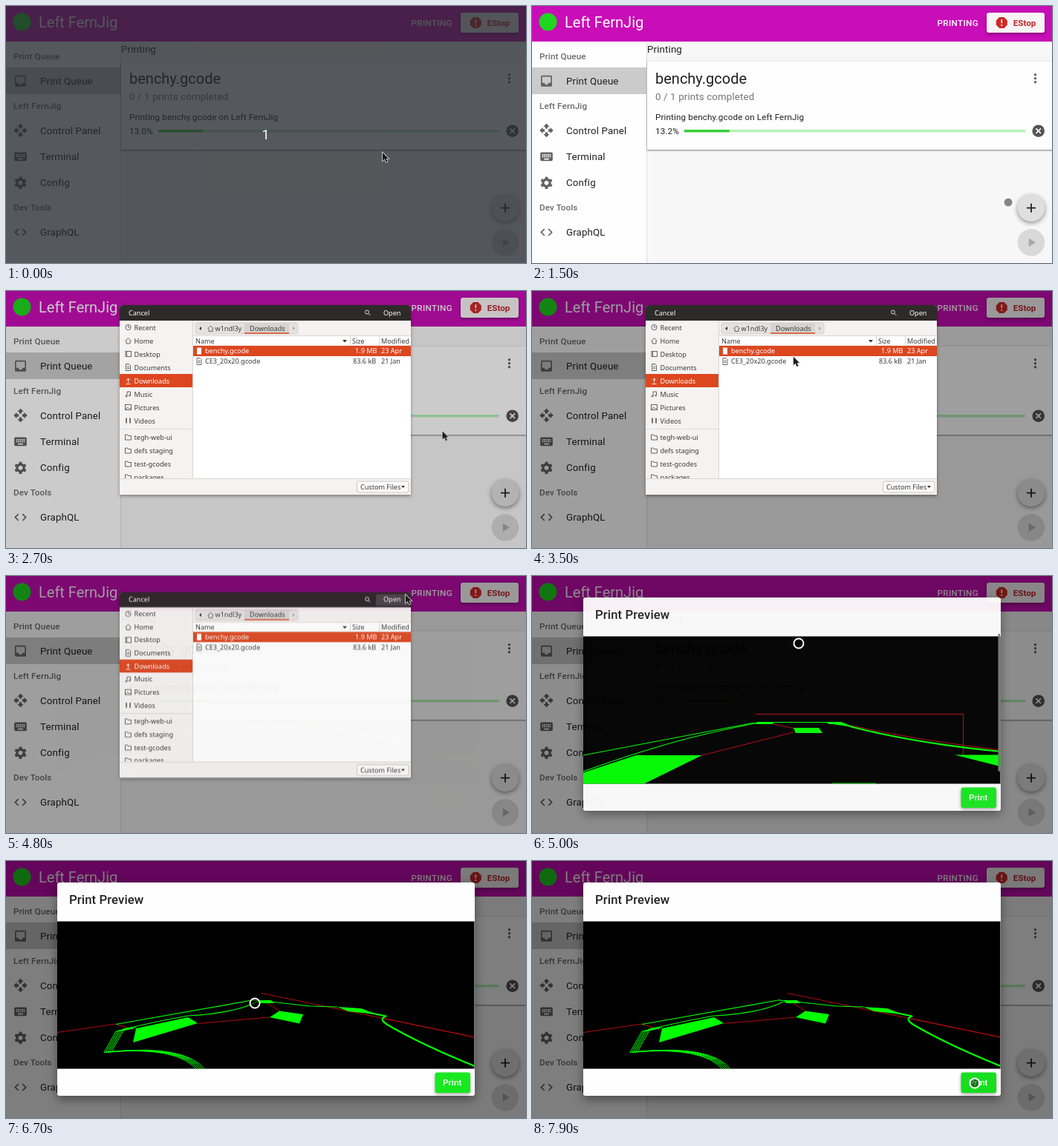
Recreate the animation shown at these times as an HTML page. Size 700x347 px, loop 8 s.

```html
<!DOCTYPE html>
<html lang="en">
<head>
<meta charset="utf-8">
<title>Print queue demo</title>
<style>
html, body { margin: 0; width: 100%; height: 100%; overflow: hidden; background: #fafafa; }
svg { display: block; width: 100vw; height: 100vh; }
text { font-family: Roboto, sans-serif; fill: #212121; white-space: pre; }
.body1 { font-size: 13.33px; letter-spacing: .00938em; }
.body2 { font-size: 11.67px; letter-spacing: .01071em; }
.h5 { font-size: 20px; }
.h6 { font-size: 16.67px; font-weight: 500; letter-spacing: .0075em; }
.sub { font-size: 11.67px; font-weight: 500; letter-spacing: .01071em; fill: #6b6b6b; }
.btn { font-size: 11.67px; font-weight: 500; letter-spacing: .02857em; }
.icon { fill: #626262; }
.white { fill: #fff; }
.lift { filter: drop-shadow(0 2px 2px rgba(0,0,0,.35)); }
.files text { font: 9.1px "Noto Sans", "Open Sans", sans-serif; fill: #3b3b3b; }
.files text.white { fill: #fff; }
.glyph { fill: none; stroke: #555; stroke-width: .9; }
.glyph .hot { stroke: #fff; }

.anim, .scene path { animation: 8s linear infinite; }
.curtain { animation-name: curtain; }
.digits { animation-name: digits; animation-timing-function: step-end; }
.bar { animation-name: bar; transform-origin: 205px 0; }
.dim { animation-name: dim; }
.files { animation-name: files; transform-origin: 349px 147px; }
.place { animation-name: place; }
.veil { animation-name: veil; }
.open { animation-name: open; }
.row { animation-name: row; }
.preview { animation-name: preview; }
.scroll { animation-name: scroll; }
.press { animation-name: press; }
.arrow { animation-name: arrow; paint-order: stroke; }
.ring { animation-name: ring; }
.scene path { animation-name: orbit; }
.fill { fill: #0f0; }
.line { fill: none; stroke: #0f0; stroke-width: 1.2; }
.thick { stroke-width: 2.2; }
.travel { fill: none; stroke: #b30d0d; stroke-width: 1; }

@keyframes curtain { 0%, 2% { opacity: 1 } 12.5%, 100% { opacity: 0 } }
@keyframes digits {
  0% { transform: translateY(0) }
  8% { transform: translateY(-20px) }
  24% { transform: translateY(-40px) }
  60% { transform: translateY(-60px) }
}
@keyframes bar { 0% { transform: scaleX(.13) } 18.75% { transform: scaleX(.132) } 100% { transform: scaleX(.14) } }
@keyframes dim {
  0%, 29.8% { opacity: 0 }
  30% { opacity: .015 }
  37.5%, 60% { opacity: .38 }
  62.5% { opacity: .45 }
  66.25%, 100% { opacity: .5 }
}
@keyframes files {
  0%, 29.99% { opacity: 0; transform: scaleY(.5) }
  30% { opacity: .6; transform: scaleY(.53); animation-timing-function: ease-out }
  33.75%, 59.9% { opacity: 1; transform: none }
  62%, 100% { opacity: 0; transform: scaleY(.6) }
}
@keyframes place { 0%, 31.2% { opacity: 0 } 33.75%, 100% { opacity: 1 } }
@keyframes veil { 0%, 30% { opacity: .2 } 33.75%, 100% { opacity: 0 } }
@keyframes row { 0%, 48.5% { opacity: 0 } 50%, 51% { opacity: .07 } 52.5%, 100% { opacity: 0 } }
@keyframes open { 0%, 56% { opacity: 0 } 57.5%, 100% { opacity: .14 } }
@keyframes preview {
  0%, 60% { opacity: 0 }
  62.5% { opacity: .95 }
  66.25%, 100% { opacity: 1 }
}
@keyframes scroll { 0%, 65% { opacity: 1 } 70%, 100% { opacity: 0 } }
@keyframes press { 0%, 98.7% { opacity: 0 } 98.75%, 100% { opacity: .04 } }
@keyframes arrow {
  0%, 16.2% { opacity: 1; transform: translate(507px,198px) }
  16.25%, 31.2% { opacity: 0; transform: translate(677px,275px) }
  31.25% { opacity: 1; transform: translate(677px,275px); animation-timing-function: ease-out }
  40%, 42% { opacity: 1; transform: translate(468px,75px) }
  43.75%, 48.7% { opacity: 1; transform: translate(352px,89px) }
  51.2% { opacity: 1; transform: translate(440px,80px) }
  51.25%, 56.2% { opacity: 0; transform: translate(539px,25px) }
  56.25%, 60% { opacity: 1; transform: translate(539px,25px) }
  61.2% { opacity: 1; transform: translate(440px,62px) }
  61.25%, 100% { opacity: 0; transform: translate(440px,62px) }
}
@keyframes ring {
  0%, 15.6% { opacity: 0; transform: translate(510px,204px) }
  16.25% { opacity: 1; transform: translate(535px,216px) }
  18.75% { opacity: 1; transform: translate(641px,265px); animation-timing-function: ease-out }
  26.25%, 31.2% { opacity: 1; transform: translate(677px,275px) }
  31.25% { opacity: 0; transform: translate(677px,275px) }
  61.2% { opacity: 0; transform: translate(440px,62px) }
  61.25% { opacity: 1; transform: translate(440px,62px) }
  62.5%, 73% { opacity: 1; transform: translate(359px,91px); animation-timing-function: ease-in-out }
  83.75%, 84.2% { opacity: 1; transform: translate(335px,192px); animation-timing-function: ease-in-out }
  92.5%, 94% { opacity: 1; transform: translate(627px,314px) }
  95%, 100% { opacity: 1; transform: translate(596px,300px) }
}
@keyframes orbit {
  0%, 73% { d: var(--a); animation-timing-function: ease-in-out }
  83.75%, 100% { d: var(--b) }
}
</style>
</head>
<body>
<svg viewBox="0 0 700 347" preserveAspectRatio="none">
  <defs>
    <clipPath id="digitsClip"><rect x="160" y="161" width="42" height="16"/></clipPath>
    <clipPath id="filesClip"><path d="M153 275V24q0-5 5-5h382q5 0 5 5v251z"/></clipPath>
    <clipPath id="placesClip"><rect x="153" y="40" width="99" height="213"/></clipPath>
    <clipPath id="sceneClip"><rect x="69" y="81.500" width="561.500" height="199"/></clipPath>
    <path id="folder" d="M0 1h3l1 1.500h4v5.500h-8z"/>
    <path id="sheet" d="M1 0h4l2 2v7h-6zM2.500 4h3M2.500 6h3"/>
  </defs>

  <!-- page -->
  <rect width="700" height="347" fill="#f8f7f7"/>
  <rect y="47" width="154" height="300" fill="#fefefe"/>
  <path d="M154.500 47v300" stroke="#dedede"/>
  <rect y="83" width="154" height="36" fill="#cbcbcb"/>
  <rect width="700" height="48" fill="#c90db7"/>
  <circle cx="21.500" cy="21.500" r="12" fill="#1fd51f"/>
  <text class="h5 white" x="44" y="29.300">Left FernJig</text>
  <text class="btn white" x="545.500" y="26.500">PRINTING</text>
  <rect class="lift" x="612" y="9" width="78" height="27" rx="3" fill="#f8f4f6"/>
  <g transform="translate(622.300 12.500) scale(.8333)">
    <path d="M15.730 3H8.270L3 8.270v7.460L8.270 21h7.460L21 15.730V8.270z" fill="#cf2a27"/>
    <path class="white" d="M11 7h2v6h-2zM11 15h2v2.500h-2z"/>
  </g>
  <text class="btn" x="647.700" y="26.500" style="fill:#c0282b;font-weight:700;letter-spacing:0">EStop</text>

  <text class="sub" x="10" y="72">Print Queue</text>
  <text class="body1" x="46" y="106">Print Queue</text>
  <text class="sub" x="10" y="139">Left FernJig</text>
  <text class="body1" x="46" y="172.500">Control Panel</text>
  <text class="body1" x="46" y="208">Terminal</text>
  <text class="body1" x="46" y="243.300">Config</text>
  <text class="sub" x="10" y="276">Dev Tools</text>
  <text class="body1" x="46" y="310.300">GraphQL</text>
  <g class="icon">
    <path transform="translate(9.500 91.300) scale(.8333)" d="M19 3H5q-2 0-2 2v14q0 2 2 2h14q2 0 2-2V5q0-2-2-2zm0 12h-4a3 3 0 0 1-6 0H5V5h14z"/>
    <path transform="translate(9.500 158) scale(.8333)" d="M10 9h4V6h3l-5-5-5 5h3zM9 10H6V7l-5 5 5 5v-3h3zM23 12l-5-5v3h-3v4h3v3zM14 15h-4v3H7l5 5 5-5h-3z"/>
    <g transform="translate(9.500 193.300) scale(.8333)">
      <rect x="2" y="5" width="20" height="14" rx="2"/>
      <path d="M5 9h14M5 12h14" stroke="#fff" stroke-width="2" stroke-dasharray="2 1"/>
      <path d="M8 16h8" stroke="#fff" stroke-width="2"/>
    </g>
    <g transform="translate(19.500 238.800) rotate(30)" fill="none" stroke="#626262">
      <circle r="4.600" stroke-width="3.400"/>
      <circle r="7" stroke-width="2.400" pathLength="12" stroke-dasharray="1 1" stroke-dashoffset=".5"/>
    </g>
    <path transform="translate(9.500 295.600) scale(.8333)" d="M9.400 16.600L4.800 12l4.600-4.600L8 6l-6 6 6 6zM14.600 16.600l4.600-4.600-4.600-4.600L16 6l6 6-6 6z"/>
  </g>

  <text class="body1" x="155" y="62.700">Printing</text>
  <rect x="155" y="74.500" width="548" height="119.500" fill="#fefefe" style="filter:drop-shadow(0 1px 1px rgba(0,0,0,.5))"/>
  <text class="h5" x="166" y="105.300">benchy.gcode</text>
  <text class="body1" x="166" y="126.500" style="fill:#757575">0 / 1 prints completed</text>
  <text class="body2" x="166" y="154.300">Printing benchy.gcode on Left FernJig</text>
  <g clip-path="url(#digitsClip)">
    <g class="anim digits">
      <text class="body2" x="166" y="173">13.0%</text>
      <text class="body2" x="166" y="193">13.2%</text>
      <text class="body2" x="166" y="213">13.3%</text>
      <text class="body2" x="166" y="233">13.7%</text>
    </g>
  </g>
  <rect x="205" y="167" width="459" height="3.400" fill="#b4f1b2"/>
  <rect class="anim bar" x="205" y="167" width="459" height="3.400" fill="#37cb35"/>
  <g class="icon">
    <circle cx="677.500" cy="92.700" r="1.700"/><circle cx="677.500" cy="97.700" r="1.700"/><circle cx="677.500" cy="102.700" r="1.700"/>
    <circle cx="681.700" cy="168.700" r="8.300" fill="#555"/>
    <path d="M678.400 165.400l6.600 6.600m0-6.600l-6.600 6.600" stroke="#fff" stroke-width="1.700"/>
  </g>
  <circle cx="672" cy="272.700" r="18.300" fill="#dfdfdf" style="filter:drop-shadow(0 2px 3px rgba(0,0,0,.45))"/>
  <path d="M666 272.700h12M672 266.700v12" stroke="#222" stroke-width="1.800"/>
  <circle cx="672" cy="319.300" r="18.300" fill="#d9d9d9"/>
  <path d="M668.700 313.500v11.600l9.200-5.800z" fill="#a8a8a8"/>

  <rect class="anim dim" width="700" height="347"/>

  <!-- file chooser -->
  <g class="anim files">
    <path class="lift" d="M153 275V24q0-5 5-5h382q5 0 5 5v251z" fill="#f4f3f2"/>
    <g clip-path="url(#filesClip)">
      <rect x="153" y="19" width="392" height="21" fill="#2d2b29"/>
      <text class="white" x="165" y="32.500">Cancel</text>
      <g fill="none" stroke="#ddd"><circle cx="486" cy="28.500" r="2.500"/><path d="M488 30.500l2.500 2.500"/></g>
      <rect class="anim open" x="498" y="22" width="43" height="16" rx="2" fill="#fff"/>
      <text class="white" x="508" y="32.500">Open</text>

      <g clip-path="url(#placesClip)">
        <rect class="anim place" x="153" y="112" width="99" height="18" fill="#dc4720"/>
        <text x="172.500" y="52.500">Recent</text>
        <text x="172.500" y="70.500">Home</text>
        <text x="172.500" y="88.500">Desktop</text>
        <text x="172.500" y="106.500">Documents</text>
        <text class="white" x="172.500" y="124.500">Downloads</text>
        <text x="172.500" y="142.500">Music</text>
        <text x="172.500" y="160.500">Pictures</text>
        <text x="172.500" y="178.500">Videos</text>
        <path d="M153 186.500h99" stroke="#dcdad8"/>
        <text x="172.500" y="200.700">tegh-web-ui</text>
        <text x="172.500" y="218.700">defs staging</text>
        <text x="172.500" y="236.700">test-gcodes</text>
        <text x="172.500" y="254.500">packages</text>
        <g class="glyph">
          <circle cx="164.500" cy="49" r="3.600"/><path d="M164.500 46.500v2.500h2"/>
          <path d="M160.500 67.500l4-4 4 4M162 67v4h5v-4"/>
          <rect x="161" y="81.500" width="7.500" height="7"/><path d="M162.500 82v6"/>
          <use href="#sheet" x="160.500" y="98.500"/>
          <path class="hot" d="M164.500 124v-6m-2.500 2.500l2.500-2.500 2.500 2.500M161.500 125.500h6"/>
          <path d="M163 142v-6h4.500v5"/><circle cx="162" cy="142" r="1"/><circle cx="166.500" cy="141" r="1"/>
          <rect x="160.500" y="153.500" width="8" height="7"/><path d="M161 160l2.500-3 2 2 1-1 2 2"/>
          <path d="M162 171.500v7m5-7v7" stroke-width="1.600"/>
          <use href="#folder" x="160.500" y="193"/><use href="#folder" x="160.500" y="211"/>
          <use href="#folder" x="160.500" y="229"/><use href="#folder" x="160.500" y="247"/>
        </g>
      </g>

      <rect x="255" y="43" width="138" height="15" rx="2.500" fill="#e4e2e0" stroke="#cfccc9" stroke-width=".8"/>
      <rect x="321" y="43.400" width="60" height="14" fill="#d6d3d0"/>
      <path class="anim place" d="M321 57h60" stroke="#dc4720" stroke-width="1.500"/>
      <path d="M263 48v5l-3-2.500z" fill="#333"/><path d="M386 48v5l3-2.500z" fill="#aaa"/>
      <path class="glyph" d="M271.500 51l4-4 4 4M273 50.500v4h5v-4"/>
      <text x="281.500" y="53.800">w1ndl3y</text>
      <text x="328" y="53.800">Downloads</text>

      <rect x="252" y="60" width="293" height="193" fill="#fff"/>
      <path d="M251.500 40v213M252 60.500h293M252 74h293M463.500 61v13M502.500 61v13M153 253.500h392" stroke="#d9d7d5" fill="none"/>
      <text x="255" y="70.800">Name</text>
      <path d="M453 66h6l-3 3.500z" fill="#333"/>
      <text x="466" y="70.800">Size</text>
      <text x="505" y="70.800">Modified</text>
      <rect x="252" y="74" width="293" height="14" fill="#dc4720"/>
      <rect class="anim row" x="252" y="74" width="293" height="28"/>
      <rect x="257" y="76.500" width="6" height="9" fill="#fff"/>
      <use href="#sheet" class="glyph" x="256" y="90.500"/>
      <text class="white" x="268" y="84.400">benchy.gcode</text>
      <text class="white" x="470" y="84.400">1.9 MB</text>
      <text class="white" x="505" y="84.400">23 Apr</text>
      <text x="268" y="98.400">CE3_20x20.gcode</text>
      <text x="467" y="98.400">83.6 kB</text>
      <text x="505" y="98.400">21 Jan</text>

      <rect x="472.500" y="257" width="69.500" height="15" rx="2" fill="#fbfafa" stroke="#c9c6c3"/>
      <text x="477" y="267.800">Custom Files</text>
      <path d="M532 263h5l-2.500 3z" fill="#333"/>
      <rect class="anim veil" x="153" y="40" width="392" height="235" fill="#3c372d"/>
    </g>
  </g>

  <!-- print preview -->
  <g class="anim preview">
    <rect x="69" y="29" width="562" height="288" rx="3" fill="#fefefe" style="filter:drop-shadow(0 5px 7px rgba(0,0,0,.4))"/>
    <text class="h6" x="85" y="58">Print Preview</text>
    <rect x="69" y="81.500" width="561.500" height="199"/>
    <g class="scene" clip-path="url(#sceneClip)">
      <path class="travel" style='--a:path("M301 186.500L580.500 186.500L580.500 242");--b:path("M344 178.500L631 238L720 258")'/>
      <path class="travel" style='--a:path("M229 242L352 211");--b:path("M258 219.500L355 211")'/>
      <path class="travel" style='--a:path("M320 199L354 206");--b:path("M352 192L370 204")'/>
      <path class="travel" style='--a:path("M425 201Q520 222 631 235");--b:path("M506 212Q560 223 631 238")'/>
      <path class="travel" style='--a:path("M-120 290L20 251L60 262");--b:path("M69 231.500L148 220L172 228")'/>
      <path class="line" style='--a:path("M69 242L297 198.500");--b:path("M148 220.500L334 187.500")'/>
      <path class="line" style='--a:path("M60 267C110 249 160 232 215 218Q250 209 300 199");--b:path("M157 227C190 220 220 213 245 209Q310 205 338 190")'/>
      <path class="line" style='--a:path("M297 199L330 197.500L395 197.500L425 201");--b:path("M333 188L360 190.500L410 196L446 197")'/>
      <path class="line thick" style='--a:path("M398 198L425 202Q430 204 470 213Q540 228 631 237");--b:path("M460 199L512 209.500Q500 213 515 222Q560 248 631 277")'/>
      <path class="fill" style='--a:path("M140 242L229 242L150 281L10 285Z");--b:path("M175 226L245 211L258 219L171 245Z")'/>
      <path class="fill" style='--a:path("M352 205L386 205L391 212L355 212Z");--b:path("M368 202.500L400 207L395 219.500L355 211Z")'/>
      <path class="fill" style='--a:path("M303 197L326 197L324 200L300 200Z");--b:path("M338 188L357 188L361 192L342 192Z")'/>
      <path class="fill" style='--a:path("M395 197L416 197L424 200L400 200Z");--b:path("M446 197L478 199L499 207L461 203Z")'/>
      <path class="fill" style='--a:path("M569 241.500L650 241.500L650 262Z");--b:path("M700 281L780 281L780 310Z")'/>
      <path class="line" style='--a:path("M404 280L463 280");--b:path("M350 310L420 310")'/>
      <!-- parallel shell lines share one pair of outlines -->
      <g class="line" style='stroke-width:1;--a:path("M60 268L20 280L-40 330Q170 320 260 350");--b:path("M165 226L148 230L132 258.500Q232 249 258 283")'>
        <path/>
        <path transform="translate(2.500 -.3)"/>
        <path transform="translate(5 -.6)"/>
        <path transform="translate(7.500 -.9)"/>
        <path transform="translate(10 -1.200)"/>
      </g>
    </g>
    <rect class="anim scroll" x="627.500" y="78" width="2.500" height="186" rx="1" fill="#777"/>
    <rect class="lift" x="577.500" y="285.500" width="47.500" height="27.500" rx="3" fill="#18e820"/>
    <rect class="anim press" x="577.500" y="285.500" width="47.500" height="27.500" rx="3"/>
    <text class="btn white" x="588" y="303.300" style="letter-spacing:.01em">Print</text>
  </g>

  <!-- countdown -->
  <g class="anim curtain">
    <rect width="700" height="347" fill="#22262c" fill-opacity=".77"/>
    <text class="white" x="349.500" y="180" font-size="18" text-anchor="middle">1</text>
  </g>

  <!-- pointers -->
  <path class="anim arrow" d="M0 0v11l2.600-2.400 2 4.400 1.900-.9-2-4.200h3.400z" fill="#1a1a1a" stroke="#d8d8d8" stroke-width="1.600"/>
  <circle class="anim ring" r="6.500" fill="rgba(0,0,0,.46)" stroke="#fff" stroke-width="1.900"/>
</svg>
</body>
</html>
```
